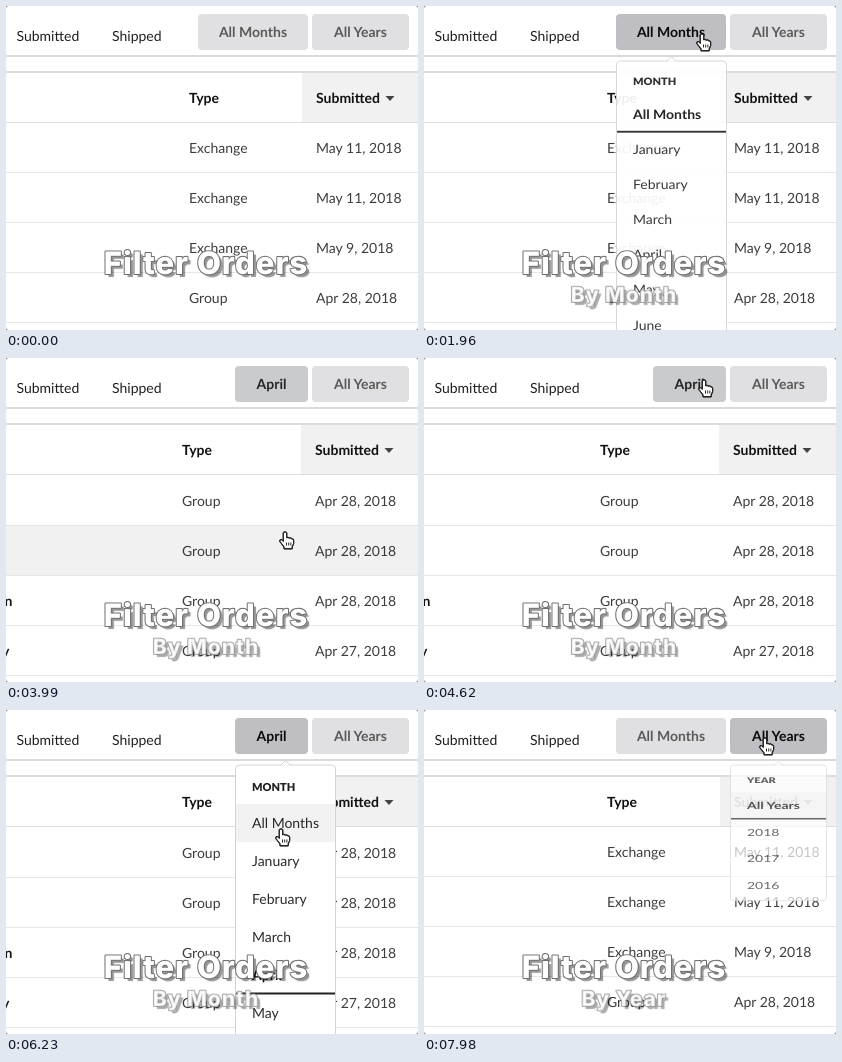
Recreate the animation shown at these times as an HTML page with a canvas. Size 412 by 324 pixels, loop 8 s.

```html
<!DOCTYPE html>
<html lang="en">
<head>
<meta charset="utf-8">
<title>Filter Orders</title>
<style>
  html, body { margin: 0; width: 100%; height: 100%; overflow: hidden; background: #888; }
  canvas { display: block; width: 412px; height: 324px; border-radius: 3px; }
</style>
</head>
<body>
<canvas id="stage"></canvas>
<script>
const W = 412, H = 324, LOOP = 8000, STEP = 70;
const canvas = document.getElementById('stage');
const ctx = canvas.getContext('2d');
const ratio = window.devicePixelRatio || 1;
canvas.width = W * ratio;
canvas.height = H * ratio;
ctx.textRendering = 'geometricPrecision';

const MONTHS = ['All Months', 'January', 'February', 'March', 'April', 'May', 'June', 'July',
  'August', 'September', 'October', 'November', 'December'];
const YEARS = ['All Years', '2018', '2017', '2016'];

const MENU_TOP = 55, HEAD = 39, ITEM = 38;
const MENUS = [
  { open: 1825, close: 3420, x: 192.5, w: 110, title: 'MONTH', items: MONTHS, selected: 0 },
  { open: 5291, close: 6780, x: 229.5, w: 100, title: 'MONTH', items: MONTHS, selected: 4 },
  { open: 7898, close: 9000, x: 306.5, w: 96, title: 'YEAR', items: YEARS, selected: 0, tint: true },
];

const PAGES = {
  all: {
    typeX: 183, dateX: 310, top: 116, month: 'All Months', monthX: 192,
    rows: [['Exchange', 'May 11, 2018'], ['Exchange', 'May 11, 2018'],
      ['Exchange', 'May 9, 2018'], ['Group', 'Apr 28, 2018']],
  },
  april: {
    typeX: 176, dateX: 309, top: 117, month: 'April', monthX: 229,
    rows: [['Group', 'Apr 28, 2018'], ['Group', 'Apr 28, 2018'],
      ['Group', 'Apr 28, 2018', 'n', 6.5], ['Group', 'Apr 27, 2018', 'y', 3.5]],
  },
};

// Pointer path: time, x, y
const PATH = [
  [455, 222, 324], [1050, 273, 20], [1260, 275, 22], [1470, 275, 22], [1680, 278, 28],
  [2100, 278, 28], [2870, 230, 263], [3920, 230, 263], [3990, 279, 174], [4620, 280, 22],
  [5810, 280, 22], [6230, 275, 119], [7140, 275, 119], [7630, 341, 28], [LOOP, 341, 28],
];
const CLICKS = [[1680, 1820], [3220, 3360], [5180, 5320], [6580, 6650], [7770, 7910]];
const HAND_FROM = 1540;

const ARROW = new Path2D('M0 0V14L3.2 11.2L5.6 16.6L8.2 15.4L5.9 10.2H10.2Z');
const HAND = new Path2D('M-1.6 1Q0 -1 1.6 1V6Q3.2 4.9 4.1 6.4Q5.9 5.5 6.5 7.1Q8.5 6.6 8.5 8.7' +
  'V11.5L7 14.8V16.6H-.8V14.8L-4.9 9.6Q-5.4 7.5 -3.6 7.8L-1.6 9.6Z');
const FINGERS = new Path2D('M1.5 10.5V13.5M3.7 10.5V13.5M5.9 10.5V13.5');

const clamp = p => Math.max(0, Math.min(1, p));
const easeOut = p => 1 - Math.pow(1 - clamp(p), 2.3);
const smooth = p => p * p * (3 - 2 * p);
const fade = (t, start, length) => clamp((t - start) / length);
const black = a => `rgba(0,0,0,${a})`;

function rect(x, y, w, h, color) {
  ctx.fillStyle = color;
  ctx.fillRect(x, y, w, h);
}

function text(str, x, y, { weight = 400, size = 14, color = black(.76), align = 'left' } = {}) {
  ctx.font = `${weight} ${size}px Lato, sans-serif`;
  ctx.textAlign = align;
  ctx.fillStyle = color;
  ctx.fillText(str, x, y);
}

function roundBox(x, y, w, h, r) {
  ctx.beginPath();
  ctx.roundRect(x, y, w, h, r);
}

function pointerAt(t) {
  if (t < PATH[0][0]) return null;
  const i = PATH.findIndex(key => key[0] > t);
  const [t0, x0, y0] = PATH[i - 1], [t1, x1, y1] = PATH[i];
  const p = smooth((t - t0) / (t1 - t0));
  return { x: x0 + (x1 - x0) * p, y: y0 + (y1 - y0) * p, hand: t >= HAND_FROM };
}

function drawTable(page, pointer, menuOpen) {
  const { typeX, dateX, top, rows } = page;
  rect(0, 49, W, 2, '#dadada');
  rect(0, 65, W, 2, '#dcdcdc');
  rect(dateX - 14, 67, W, 49, '#f1f1f1');
  rect(0, 116, W, 1, '#dedede');
  const bold = { weight: 700, color: '#111' };
  text('Type', typeX, 97, bold);
  text('Submitted', dateX, 97, bold);
  ctx.fillStyle = '#444';
  ctx.beginPath();
  ctx.moveTo(dateX + 69.5, 90);
  ctx.lineTo(dateX + 78.5, 90);
  ctx.lineTo(dateX + 74, 95);
  ctx.fill();

  rows.forEach(([type, date, tail, tailX], i) => {
    const y = top + i * 50;
    const hover = pointer && pointer.hand && !menuOpen && pointer.y > y && pointer.y <= y + 50;
    if (hover) rect(0, y + 1, W, 49, '#f1f1f1');
    rect(0, y + 50, W, 1, '#e6e6e6');
    text(type, typeX, y + 31);
    text(date, dateX, y + 31);
    if (tail) text(tail, tailX, y + 31, { ...bold, align: 'right' });
  });
}

function drawButton(label, x, right, { open, focus, pointer }) {
  const hover = pointer && pointer.hand && pointer.y < 44 && pointer.x > x && pointer.x < right;
  roundBox(x, 8, right - x, 36, 4);
  ctx.fillStyle = open ? '#bfbec2' : hover || focus ? '#cacbcd' : '#e0e0e2';
  ctx.fill();
  const color = black(open ? .95 : hover || focus ? .82 : .6);
  text(label, (x + right) / 2, 31, { weight: 700, color, align: 'center' });
}

const openness = (menu, t) => easeOut((t - menu.open) / 200) * (1 - easeOut((t - menu.close) / 200));

function drawMenu(menu, amount, pointer) {
  const { x, w, title, items, selected, tint } = menu;
  const height = HEAD + ITEM * items.length + 2;
  ctx.save();
  ctx.translate(x, MENU_TOP);
  ctx.scale(1, amount);
  ctx.globalAlpha = amount;

  roundBox(0, 0, w, height, 4);
  ctx.fillStyle = '#fff';
  ctx.fill();
  ctx.strokeStyle = '#d4d4d5';
  ctx.lineWidth = 1;
  ctx.stroke();

  ctx.beginPath();
  ctx.moveTo(w / 2 - 5, .5);
  ctx.lineTo(w / 2, -4.5);
  ctx.lineTo(w / 2 + 5, .5);
  ctx.fill();
  ctx.stroke();

  text(title, 16.5, 26, { weight: 900, size: 11, color: black(.88) });
  const hovered = Math.floor((pointer.y - MENU_TOP - HEAD) / ITEM);
  items.forEach((item, i) => {
    const y = HEAD + ITEM * i, active = i === selected;
    if (i === hovered || (active && tint)) rect(.5, y, w - 1, ITEM, '#f2f2f2');
    if (active) rect(.5, y + ITEM - 1.5, w - 1, 2, '#222');
    text(item, 16.5, y + 23.5, { weight: active ? 700 : 400, color: black(active ? .92 : .84) });
  });
  ctx.restore();
}

function caption(str, y, { size, spacing, outline, alpha }) {
  if (alpha <= 0) return;
  const x = 200;
  ctx.save();
  ctx.globalAlpha = alpha;
  ctx.font = `800 ${size}px Inter, sans-serif`;
  ctx.letterSpacing = `${spacing}px`;
  ctx.textAlign = 'center';
  ctx.lineJoin = 'round';
  ctx.lineWidth = 2;
  ctx.strokeStyle = outline;
  ctx.fillStyle = '#fff';
  ctx.shadowColor = black(.42);
  ctx.shadowBlur = ratio;
  ctx.shadowOffsetX = ctx.shadowOffsetY = 3 * ratio;
  ctx.fillText(str, x, y);
  ctx.shadowColor = 'transparent';
  ctx.strokeText(str, x, y);
  ctx.fillText(str, x, y);
  ctx.restore();
}

function subtitle(str, alpha) {
  caption(str, 296, { size: 21, spacing: .9, outline: '#969696', alpha: alpha * .8 });
}

function drawPointer({ x, y, hand }) {
  ctx.save();
  ctx.translate(x, y);
  ctx.lineJoin = 'round';
  ctx.lineWidth = 1.6;
  ctx.strokeStyle = hand ? '#111' : '#fff';
  ctx.fillStyle = hand ? '#fff' : '#111';
  const shape = hand ? HAND : ARROW;
  ctx.stroke(shape);
  ctx.fill(shape);
  if (hand) {
    ctx.lineWidth = .9;
    ctx.stroke(shape);
    ctx.stroke(FINGERS);
  }
  ctx.restore();
}

function drawClick({ x, y }) {
  ctx.beginPath();
  ctx.arc(x, y, 30, 0, Math.PI * 2);
  ctx.lineWidth = 2;
  ctx.strokeStyle = 'rgba(120,120,120,.4)';
  ctx.stroke();
}

function draw(t) {
  ctx.setTransform(ratio, 0, 0, ratio, 0, 0);
  rect(0, 0, W, H, '#fff');

  const page = t >= 3570 && t < 7000 ? PAGES.april : PAGES.all;
  const pointer = pointerAt(t);
  const menu = MENUS.find(m => t >= m.open && t < m.close + 200);
  const yearsOpen = menu === MENUS[2];

  drawTable(page, pointer, !!menu);
  text('Submitted', 10.5, 35, { color: black(.88) });
  text('Shipped', 106, 35, { color: black(.88) });
  drawButton(page.month, page.monthX, 302,
    { open: menu && !yearsOpen, focus: t >= 1680 && t < 7770, pointer });
  drawButton('All Years', 306, 403, { open: yearsOpen, pointer });

  if (menu) drawMenu(menu, openness(menu, t), pointer);
  caption('Filter Orders', 268, { size: 31, spacing: 1, outline: '#707070', alpha: 1 });
  subtitle('By Month', fade(t, 1470, 350) - fade(t, 7140, 280));
  subtitle('By Year', fade(t, 7700, 210));

  if (CLICKS.some(([from, to]) => t >= from && t < to)) drawClick(pointer);
  if (pointer) drawPointer(pointer);
}

function frame() {
  const t = performance.now() % LOOP;
  draw(Math.floor(t / STEP) * STEP);
  requestAnimationFrame(frame);
}
frame();
</script>
</body>
</html>
```
